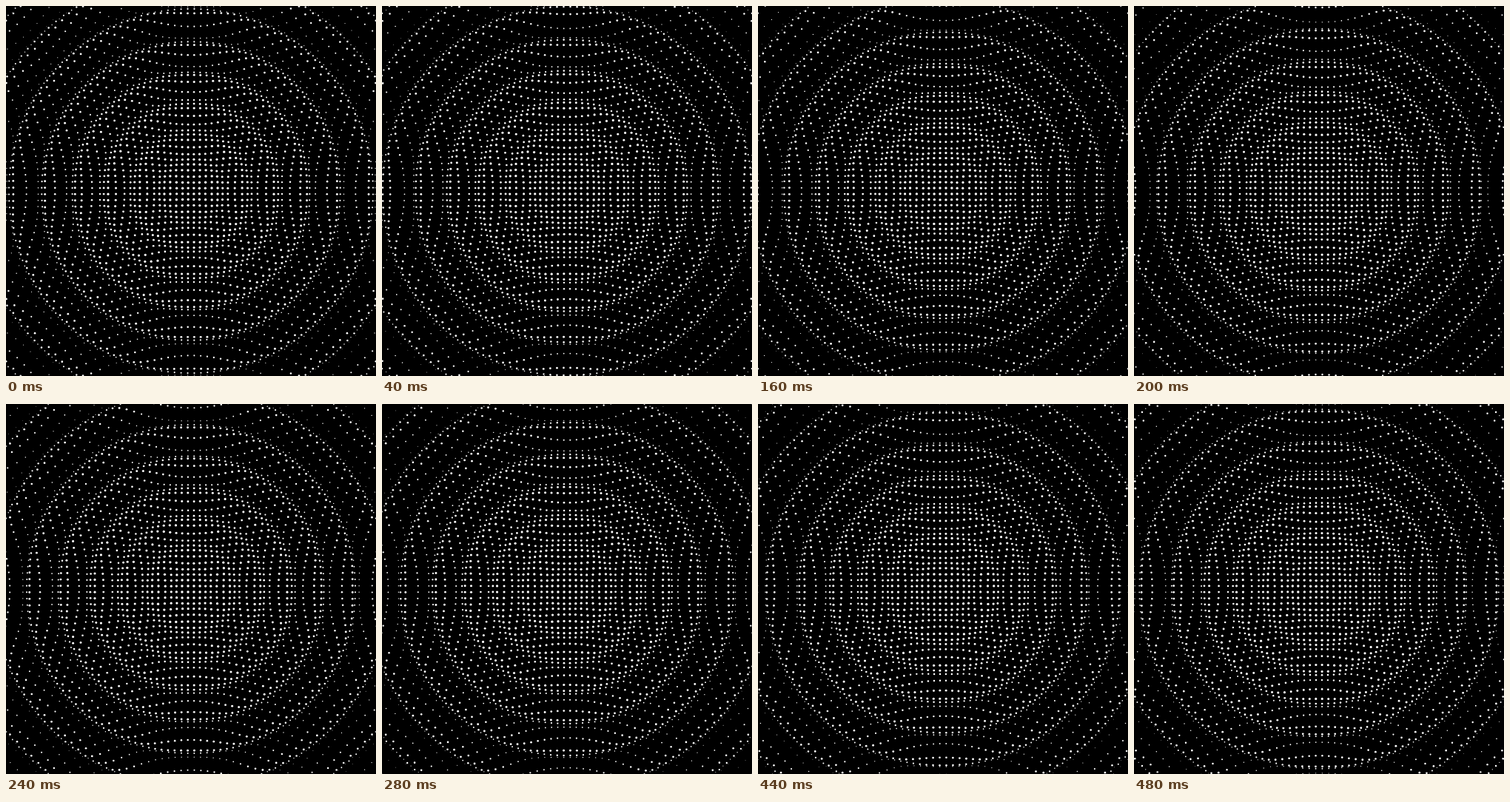
Animation of 500x500 px, one loop 0.52 s. Source, as an HTML page without scripts:

```html
<!DOCTYPE html>
<html lang="en">
<head>
<meta charset="utf-8">
<title>Rippling dots</title>
<style>
  @property --t { syntax: "<number>"; inherits: true; initial-value: 0; }
  @property --x { syntax: "<number>"; inherits: false; initial-value: 0; }
  @property --y { syntax: "<number>"; inherits: false; initial-value: 0; }
  @property --bulge { syntax: "<number>"; inherits: false; initial-value: 1; }
  @property --dist { syntax: "<number>"; inherits: false; initial-value: 0; }
  @property --wave { syntax: "<number>"; inherits: false; initial-value: 0; }
  @property --scale { syntax: "<number>"; inherits: false; initial-value: 1; }

  html, body { margin: 0; width: 100%; height: 100%; overflow: hidden; background: #000; }
  svg { display: block; width: 100%; height: 100%; fill: #fff; animation: ripple 520ms steps(13) infinite; }
  @keyframes ripple { from { --t: 0; } to { --t: 1; } }

  /* Grid position comes from the inherited column and row digits (base 6).
     The grid spreads outwards, then a radial wave pushes it in and out. */
  circle {
    --x: calc(7.8125 * (0.5 + var(--col) + 6 * var(--col6)));
    --y: calc(7.8125 * (0.5 + var(--row) + 6 * var(--row6)));
    --bulge: calc(1 + 0.000003 * (var(--x) * var(--x) + var(--y) * var(--y)));
    --dist: calc(var(--bulge) * hypot(var(--x), var(--y)));
    --wave: sin(6.283185 * (var(--t) + 0.11 - var(--dist) * (0.0277 - 0.0000117 * var(--dist))));
    --scale: calc(var(--bulge) * (1 + 0.028 * var(--wave)));
    cx: calc(1px * var(--x) * var(--scale));
    cy: calc(1px * var(--y) * var(--scale));
    r: calc(1px * max(0.35, 1.75 - var(--dist) * (0.003 - 0.0016 * var(--wave))));
  }
</style>
</head>
<body>
<svg viewBox="-250 -250 500 500">
  <defs>
    <circle id="dot"/>
    <g id="dots">
      <use href="#dot" style="--col:0"/>
      <use href="#dot" style="--col:1"/>
      <use href="#dot" style="--col:2"/>
      <use href="#dot" style="--col:3"/>
      <use href="#dot" style="--col:4"/>
      <use href="#dot" style="--col:5"/>
    </g>
    <g id="line">
      <use href="#dots" style="--col6:0"/>
      <use href="#dots" style="--col6:1"/>
      <use href="#dots" style="--col6:2"/>
      <use href="#dots" style="--col6:3"/>
      <use href="#dots" style="--col6:4"/>
    </g>
    <g id="lines">
      <use href="#line" style="--row:0"/>
      <use href="#line" style="--row:1"/>
      <use href="#line" style="--row:2"/>
      <use href="#line" style="--row:3"/>
      <use href="#line" style="--row:4"/>
      <use href="#line" style="--row:5"/>
    </g>
    <g id="quarter">
      <use href="#lines" style="--row6:0"/>
      <use href="#lines" style="--row6:1"/>
      <use href="#lines" style="--row6:2"/>
      <use href="#lines" style="--row6:3"/>
      <use href="#lines" style="--row6:4"/>
    </g>
  </defs>
  <use href="#quarter"/>
  <use href="#quarter" transform="scale(-1 1)"/>
  <use href="#quarter" transform="scale(1 -1)"/>
  <use href="#quarter" transform="scale(-1 -1)"/>
</svg>
</body>
</html>
```
